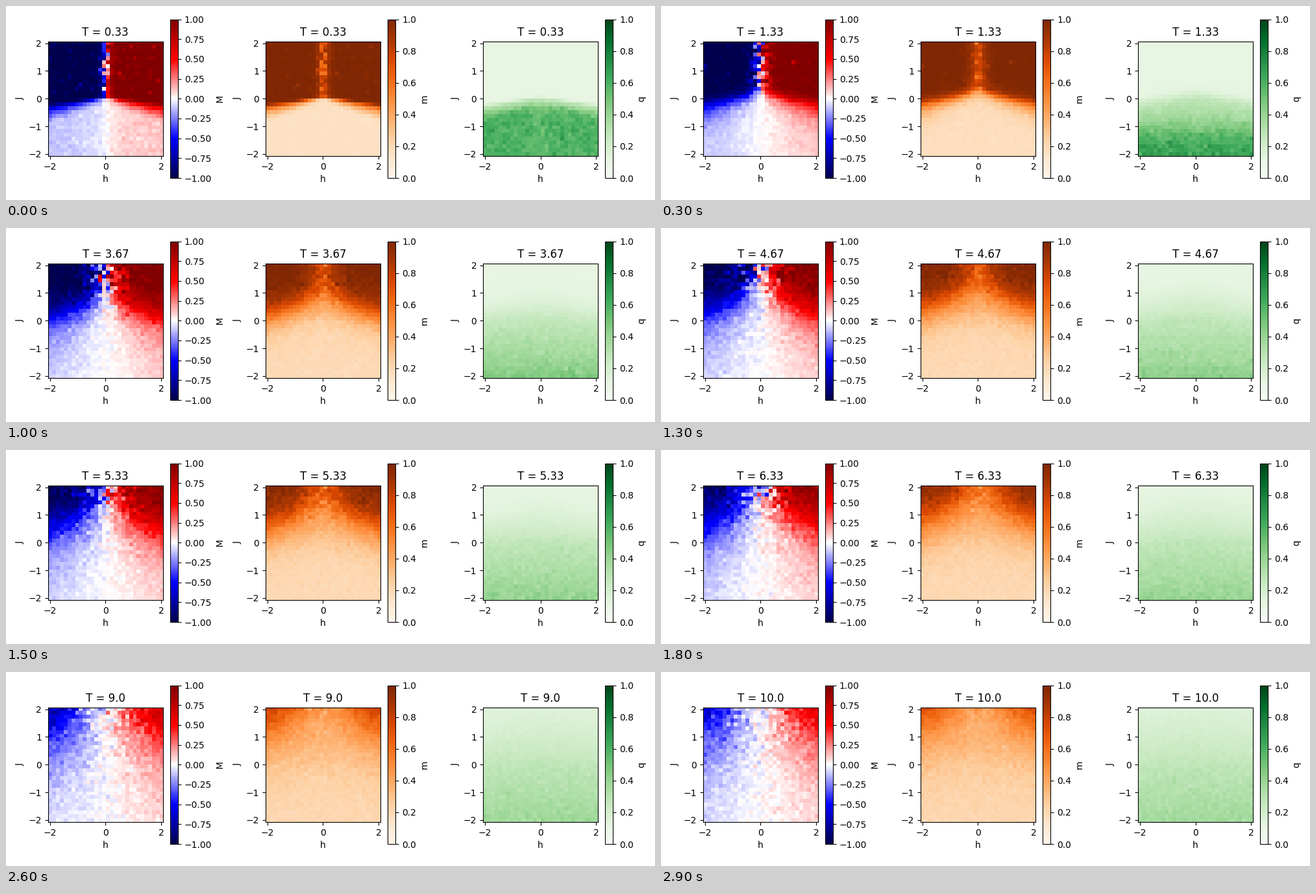
These frames come from a looping animation (1000x300 px, 3000 ms). A matplotlib script:

```python
import itertools

import matplotlib.pyplot as plt
import numpy as np
from matplotlib.animation import FuncAnimation

W, H, DPI = 1000, 300, 100
FRAMES, INTERVAL = 30, 100
CELLS, LIMIT = 30, 2.0

plt.rcParams["font.family"] = "DejaVu Sans"

# Every state of a small open spin lattice, 3 by 3 sites.
spins = np.array(list(itertools.product((-1, 1), repeat=9)), float).reshape(-1, 3, 3)
checker = (-1.0) ** np.add.outer(np.arange(3), np.arange(3))
total = spins.sum((1, 2))
bonds = ((spins[:, 1:] * spins[:, :-1]).sum((1, 2))
         + (spins[:, :, 1:] * spins[:, :, :-1]).sum((1, 2)))
staggered = np.abs((spins * checker).sum((1, 2)))
observables = np.stack([total, np.abs(total), staggered, total**2 / 9], axis=1) / 9

# Aligning couplings act on neighbours, opposing ones on all pairs as well.
aligning = 2.3 * bonds
opposing = 0.35 * total**2 + 0.6 * bonds

axis = np.linspace(-LIMIT, LIMIT, CELLS)
h, J = np.meshgrid(axis, axis)


def sigmoid(x):
    return 1 / (1 + np.exp(-np.clip(x, -50, 50)))


def thermal_means(T):
    """Exact averages of M, |M|, staggered |M| and M squared on the grid."""
    j = J.reshape(-1, 1)
    weight = (j * np.where(j > 0, aligning, opposing) + h.reshape(-1, 1) * total) / T
    weight = np.exp(weight - weight.max(axis=1, keepdims=True))
    means = weight @ observables / weight.sum(axis=1, keepdims=True)
    return means.T.reshape(4, CELLS, CELLS)


def sample(index):
    """Noisy M, m and q maps, as a short simulation would measure them."""
    T = (index + 1) / 3
    rng = np.random.default_rng(100 + index)
    M, m, q, square = thermal_means(T)
    noise = rng.normal(size=(3, CELLS, CELLS))
    coupling = 2 * J / T

    # Slow mixing in the ordered phase leaves scatter around h = 0.
    frozen = sigmoid((coupling - 0.6) / 0.1)
    glassy = np.exp(-T / 2) * sigmoid(-(J + 0.3) / 0.1)
    spread = 0.12 + 0.4 * frozen
    near = np.exp(-(h / min(0.2 + 0.1 * T, 1.1)) ** 2)
    delay = rng.exponential(size=h.shape)
    lag = 0.45 * delay * np.exp(-(h / 0.14) ** 2) + 0.012 * delay**2 * np.exp(-T / 2)
    lag = np.minimum(lag * frozen, 1)
    dip = (0.08 + 0.02 * T + 0.11 * rng.random(h.shape)) * near
    dip *= sigmoid((coupling - 0.25) / 0.06)

    M_noise = spread * np.sqrt(np.maximum(square - M**2, 0)) * noise[0]
    M_noise += 0.025 * glassy * rng.normal(size=h.shape)
    M = M * (1 - lag) * (1 - dip) * (1 - 0.35 * glassy * np.exp(-h**2)) + M_noise

    m_noise = 0.6 * spread * np.sqrt(np.maximum(square - m**2, 0)) * noise[1]
    floor = 0.14 + 0.055 * (1 - np.exp(-T / 2))
    m = (m**6 + floor**6) ** (1 / 6) * (1 - dip) * (1 - 0.3 * lag)
    m += m_noise + 0.004 * noise[1] * (J < 0)

    slope = min(0.4 + 0.13 * T, 1.5)
    q = np.where(q > 0.27, 0.27 + slope * (q - 0.27), q)
    q -= 0.06 * glassy * np.exp(-(h / 0.2) ** 2)
    q += 0.075 * np.maximum(q - 0.11, 0) * noise[2]

    return np.clip(M, -1, 1), np.clip(m, 0, 1), np.clip(q, 0, 1)


def add_panel(ax, cmap, vmin, label):
    edge = LIMIT + LIMIT / (CELLS - 1)
    image = ax.imshow(np.zeros((CELLS, CELLS)), cmap=cmap, vmin=vmin, vmax=1,
                      origin="lower", extent=(-edge, edge, -edge, edge),
                      interpolation="nearest")
    ax.set_xticks([-2, 0, 2])
    ax.set_yticks([-2, -1, 0, 1, 2])
    ax.set_xlabel("h")
    ax.set_ylabel("J")
    fig.colorbar(image, ax=ax, label=label)
    return image, ax.set_title("T = 0.33")


fig, axes = plt.subplots(1, 3, figsize=(W / DPI, H / DPI), dpi=DPI, facecolor="white")
styles = [("seismic", -1, "M"), ("Oranges", 0, "m"), ("Greens", 0, "q")]
panels = [add_panel(ax, *style) for ax, style in zip(axes, styles)]
fig.tight_layout()


def update(index):
    title = f"T = {round((index + 1) / 3, 2)}"
    for (image, text), data in zip(panels, sample(index)):
        image.set_data(data)
        text.set_text(title)
    return [artist for panel in panels for artist in panel]


anim = FuncAnimation(fig, update, frames=FRAMES, interval=INTERVAL,
                     repeat=True, repeat_delay=0, blit=False)
plt.show()
```
